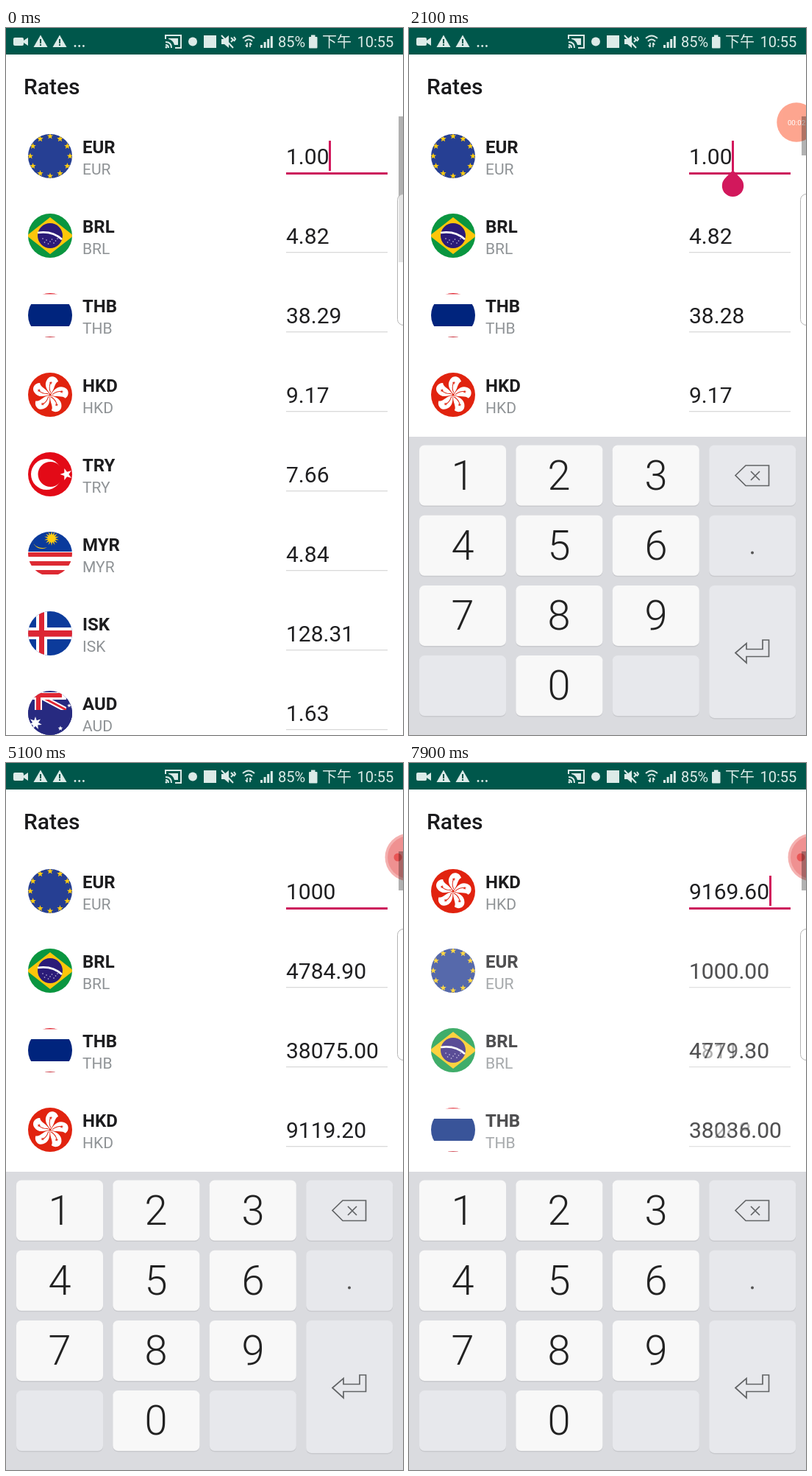
Animation of 540x960 px, one loop 8 s. Source, as an HTML page:

```html
<!DOCTYPE html>
<html lang="en">
<head>
<meta charset="utf-8">
<title>Rates</title>
<style>
html, body { margin: 0; width: 100%; height: 100%; overflow: hidden; background: #fff; }
svg { display: block; width: 100vw; height: 100vh; }
text { font-family: Roboto, "Noto Sans CJK TC", "Noto Sans CJK SC", "Noto Sans CJK JP", "Noto Sans CJK", sans-serif; }
.title { font-size: 30px; font-weight: 500; fill: #1a1a1c; }
.code { font-size: 24px; font-weight: 700; fill: #1d1d1f; }
.sub { font-size: 21px; fill: #8f9396; }
.value { font-size: 30px; fill: #1f1f21; }
.status { font-size: 20px; fill: #dcebe8; }
.digit { font-size: 56px; font-weight: 300; fill: #222; text-anchor: middle; }
.timer { font-size: 12px; fill: #fff; text-anchor: middle; }
</style>
</head>
<body>
<svg viewBox="0 0 540 960" preserveAspectRatio="none">
  <defs>
    <clipPath id="disc"><circle r="30"/></clipPath>
    <clipPath id="page"><rect id="pageBox" width="540" height="960"/></clipPath>
  </defs>
  <rect width="540" height="960" fill="#f7f7f7"/>
  <g clip-path="url(#page)">
    <rect width="540" height="960" fill="#fff"/>
    <text class="title" x="24" y="90">Rates</text>
    <g id="list"></g>
  </g>
  <g id="bubble"></g>
  <rect id="thumb" x="534" y="120" width="6" fill="#000" fill-opacity=".3"/>
  <rect x="532.5" y="225.5" width="20" height="178" rx="8" fill="#fff" fill-opacity=".65" stroke="#b4b4b4"/>
  <g id="keyboard"></g>
  <g id="statusBar"></g>
</svg>
<script>
const LOOP = 8000, STEP = 100, FADE = 250, ROW = 108, TOP = 174;
const $ = id => document.getElementById(id);
const clamp = v => Math.max(0, Math.min(1, v));
const ease = v => (1 - Math.cos(Math.PI * clamp(v))) / 2;
const mix = (a, b, k) => a + (b - a) * k;

const rect = (x, y, w, h, fill, extra = '') =>
  `<rect x="${x}" y="${y}" width="${w}" height="${h}" fill="${fill}" ${extra}/>`;
const circle = (x, y, r, fill, extra = '') =>
  `<circle cx="${x}" cy="${y}" r="${r}" fill="${fill}" ${extra}/>`;
const path = (d, fill, extra = '') => `<path d="${d}" fill="${fill}" ${extra}/>`;
const line = (d, color, width) => path(d, 'none', `stroke="${color}" stroke-width="${width}"`);
const text = (cls, x, y, s) => `<text class="${cls}" x="${x}" y="${y}">${s}</text>`;
const repeat = (n, draw) => Array.from({ length: n }, (_, i) => draw(i)).join('');

function star(x, y, r, fill, points = 5, inner = 0.42, turn = -Math.PI / 2) {
  const corners = Array.from({ length: points * 2 }, (_, i) => {
    const a = turn + i * Math.PI / points, q = i % 2 ? r * inner : r;
    return `${(x + q * Math.cos(a)).toFixed(2)} ${(y + q * Math.sin(a)).toFixed(2)}`;
  });
  return path(`M${corners.join('L')}Z`, fill);
}

const ground = fill => rect(-30, -30, 60, 60, fill);
const flags = {
  EUR: ground('#263f93') + repeat(12, i =>
    star(27 * Math.sin(i * Math.PI / 6), -27 * Math.cos(i * Math.PI / 6), 4.4, '#fc1')),
  BRL: ground('#0a9640') + path('M-32 0L0-25L32 0L0 25Z', '#fdc60a') + circle(0, 0, 17, '#2b1b78') +
    line('M-17-4Q3-7 16 5', '#fff', 2.6) +
    repeat(9, i => circle(-10 + i * 2.5, 4 + (i * 5) % 8, 0.8, '#cfcbe6')),
  THB: ground('#fff') + rect(-30, -30, 60, 1.4, '#e0202c') + rect(-30, -15, 60, 30, '#00247d') +
    rect(-30, 29, 60, 1, '#c5202c'),
  HKD: ground('#e1230f') + repeat(5, i => `<g transform="rotate(${i * 72 + 12})">` +
    path('M0-1C-5-5-12-11-8-20C-5-27 4-26 7-20C2-17 5-8 0-1Z', '#fff') +
    line('M0-3Q-4-9-3-15', '#e1230f', 1) + star(-2.5, -16, 2.4, '#e1230f') + '</g>'),
  TRY: ground('#e30a17') + circle(-5, 0, 21, '#fff') + circle(0.5, 0, 17, '#e30a17') +
    star(22, 0, 8.5, '#fff', 5, 0.4, Math.PI),
  MYR: ground('#fff') + rect(-30, -30, 60, 27, '#0a3a9c') +
    repeat(3, i => rect(-30, -2 + i * 12, 60, 6, '#dd2a33')) +
    path('M-24-19A14 11 0 0 0-4-9A13 13 0 0 1-24-19Z', '#fc1') +
    star(2, -21, 10, '#fc1', 14, 0.5),
  ISK: ground('#0c3b9b') + rect(-19, -30, 15, 60, '#fff') + rect(-30, -8, 60, 16, '#fff') +
    rect(-15, -30, 7, 60, '#dc2634') + rect(-30, -4, 60, 8.5, '#dc2634'),
  AUD: ground('#272a80') + line('M-16-24L24-3', '#fff', 7) + line('M-16-24L24-3', '#df2633', 3) +
    line('M-16-30V-4M-30-23H22', '#fff', 10) + line('M-16-30V-4M-30-24H16', '#df2633', 6) +
    rect(-30, -4, 60, 34, '#272a80') + rect(22, -30, 8, 60, '#272a80') +
    star(-20, 14, 9, '#fff', 7, 0.45) + star(14, 21, 3.5, '#fff') + star(26, -10, 3, '#fff')
};
const codes = Object.keys(flags);

// Each update: start time, then one value per currency in list order.
const updates = [
  [-FADE, '1.00', '4.82', '38.29', '9.17', '7.66', '4.84', '128.31', '1.63'],
  [750, '1.00', '4.82', '38.29', '9.18', '7.67', '4.84', '128.34', '1.63'],
  [1750, '1.00', '4.82', '38.28', '9.17'],
  [2500, '1.0', '4.81', '38.26', '9.17'],
  [3700, '10', '48.08', '382.52', '91.62'],
  [4700, '1000', '4784.90', '38075.00', '9119.20'],
  [5750, '1000', '4797.80', '38178.00', '9143.80'],
  [6800, '1000.00', '4811.80', '38288.00', '9169.60'],
  [7750, '1000.00', '4779.30', '38036.00', '9169.60']
];
const edits = [[0, '1.00'], [2300, '1.0'], [2600, '1.'], [2900, '1'], [3500, '10'], [3900, '100'], [4600, '1000']];
const presses = [[2200, 'del'], [2500, 'del'], [2800, 'del'], [3400, '0'], [3800, '0'], [4500, '0']];
const SWITCH = 6700, MOVE = 6800, RESIZE = 1300;
const latest = (table, t) => table.filter(e => e[0] <= t).pop();

const ruler = document.createElement('canvas').getContext('2d');
function textWidth(s) {
  ruler.font = '30px Roboto, sans-serif';
  return ruler.measureText(s).width;
}

const underlines = {
  focus: rect(381, 22, 138, 3, '#cc1a5c'),
  left: rect(381, 22, 138, 2, '#666'),
  idle: rect(381, 22, 138, 1.3, '#d9d9d9')
};

function row(code, value, y, alpha, underline, cursor) {
  return `<g transform="translate(0 ${y.toFixed(2)})" opacity="${alpha.toFixed(3)}">` +
    `<g transform="translate(60 0)" clip-path="url(#disc)">${flags[code]}</g>` +
    text('code', 104, -4.5, code) + text('sub', 104, 24.5, code) + text('value', 381, 11, value) +
    underlines[underline] +
    (cursor ? rect(Math.round(381 + textWidth(value)), -21, 3, 41, '#d2185c') : '') + '</g>';
}

function drawList(t) {
  const now = latest(updates, t), before = updates[Math.max(0, updates.indexOf(now) - 1)];
  const p = ease((t - now[0]) / FADE), moved = ease((t - MOVE) / FADE);
  const focus = t < SWITCH ? 'EUR' : 'HKD';
  const edit = latest(edits, t);
  const blinkStart = t < SWITCH ? edit[0] : SWITCH;
  const blinkOn = Math.floor((t - blinkStart) / 500) % 2 === 0;
  const drawRow = code => {
    const i = codes.indexOf(code), slot = i < 3 ? i + 1 : i === 3 ? 0 : i;
    const y = TOP + ROW * mix(i, slot, moved);
    const isFocus = code === focus, cursor = isFocus && blinkOn;
    if (code === 'EUR' && t < MOVE)
      return row(code, edit[1], y, 1, isFocus ? 'focus' : 'left', cursor);
    const underline = isFocus ? 'focus' : 'idle', value = now[i + 1];
    if (value === undefined) return '';
    if (p >= 1 || (isFocus && now[0] > MOVE)) return row(code, value, y, 1, underline, cursor);
    const leaving = code === 'EUR' && now[0] === MOVE;
    return row(code, before[i + 1], y, 1 - p, leaving ? 'left' : underline, cursor) +
      row(code, value, y, p, underline, cursor);
  };
  const handle = t >= RESIZE && t < 2300
    ? path('M440.5 193L451 204A14.7 14.7 0 1 1 430 204Z', '#d2185c') : '';
  // HKD comes last so that it passes over the other rows.
  $('list').innerHTML = codes.filter(c => c !== 'HKD').concat('HKD').map(drawRow).join('') + handle;
  $('pageBox').setAttribute('height', t < RESIZE ? 960 : 555);
  $('thumb').setAttribute('height', t < RESIZE ? 198 : 53);
}

function drawKeyboard(t) {
  const k = clamp((t - RESIZE) / 400);
  const last = latest(presses, t), down = last && t < last[0] + 100 ? last[1] : '';
  const keyX = col => 14 + col * 131.4, keyY = r => 566.5 + r * 95.2;
  const key = (col, r, fill, h = 82) =>
    rect(keyX(col), keyY(r) + 1.5, 118, h, '#c9cace', 'rx="7"') +
    rect(keyX(col), keyY(r), 118, h, fill, 'rx="7"');
  const plain = '#f8f8f8', dim = '#e7e8ec', ink = '#626466';
  const digit = (n, col, r) => key(col, r, down === n ? '#c3c4c8' : plain) +
    text('digit', Math.round(keyX(col) + 59), Math.round(keyY(r) + 60), n);
  $('keyboard').innerHTML = k ? `<g opacity="${k}" transform="translate(0 ${104 * (1 - k)})">` +
    rect(0, 555, 540, 405, '#dadbdf') +
    repeat(9, i => digit(String(i + 1), i % 3, Math.floor(i / 3))) +
    key(0, 3, dim) + digit('0', 1, 3) + key(2, 3, dim) +
    key(3, 0, down === 'del' ? '#b5b6ba' : dim) + key(3, 1, dim) + key(3, 2, dim, 180) +
    line('M444 607.5L458 594H489.5V621.5H458ZM465 602L477 614M477 602L465 614', ink, 1.7) +
    circle(467, 712.5, 2, '#555') +
    line('M444 848.5L459 835.5V843.5H481V831H489.5V853.5H459V862Z', ink, 1.7) + '</g>' : '';
}

function drawBubble(t) {
  if (t >= 4700) {
    $('bubble').innerHTML = '<g opacity=".86">' + circle(548, 128, 32.5, '#f3a5a4') +
      circle(548, 128, 29, '#ed7f7f') + circle(533, 128, 5.5, '#e53a3a') + '</g>';
    return;
  }
  const shown = clamp((t - 700) / 300), tuck = clamp((t - 1900) / 200);
  const label = '00:0' + Math.max(0, Math.floor((t - 100) / 1000));
  $('bubble').innerHTML = shown ? `<g opacity="${shown * mix(1, 0.53, tuck)}" ` +
    `transform="translate(${mix(507, 527, tuck)} 128) scale(${mix(1, 0.81, tuck)})">` +
    circle(0, 0, 33, '#fd562e') + text('timer', 0, 4.5, label) + '</g>' : '';
}

function drawStatusBar() {
  const ink = '#dcebe8', dark = '#00574b';
  const warning = x => path(`M${x} 9.5L${x + 9.5} 26H${x - 9.5}Z`, ink) +
    rect(x - 1, 15, 2, 6, dark) + rect(x - 1, 22, 2, 2, dark);
  $('statusBar').innerHTML = rect(0, 0, 540, 36, dark) +
    rect(10, 13, 14, 11, ink, 'rx="2"') + path('M24 17L30 13V24L24 20Z', ink) +
    warning(47) + warning(73) + repeat(3, i => circle(94 + i * 5.7, 24.5, 1.4, ink)) +
    line('M217 15V10H238V27H230M217 19Q225 19 225 27M217 23Q221 23 221 27', ink, 2) +
    path('M221 14H234V23H229Q227 16 221 15Z', ink) + circle(218, 26, 1.5, ink) +
    circle(254, 18.5, 6, ink) + rect(269, 10, 17, 17, ink) +
    path('M293 15H297L303 10V27L297 22H293Z', ink) +
    line('M293 10L309 27M306 13L309 16L306 19M310 12L312 15L310 18', ink, 2) +
    line('M322 14Q330 7 338 14M325 18Q330 13 335 18', ink, 2) +
    line('M328 26V20M332 20V26M326 23L328 26M334 23L332 20', ink, 1.6) +
    repeat(4, i => rect(346 + i * 4.6, 23 - i * 4, 3, 4 + i * 4, ink)) +
    text('status', 370, 26, '85%') +
    rect(415, 9.5, 5.5, 3, ink) + rect(412, 12, 11.5, 15.5, ink, 'rx="1"') +
    text('status', 430, 26, '下午') + text('status', 477.5, 26, '10:55');
}

const start = performance.now();
let shownStep = -1;
function frame() {
  const step = Math.floor(((performance.now() - start) % LOOP) / STEP);
  if (step !== shownStep) {
    shownStep = step;
    [drawList, drawKeyboard, drawBubble].forEach(draw => draw(step * STEP));
  }
  requestAnimationFrame(frame);
}
drawStatusBar();
frame();
</script>
</body>
</html>
```
